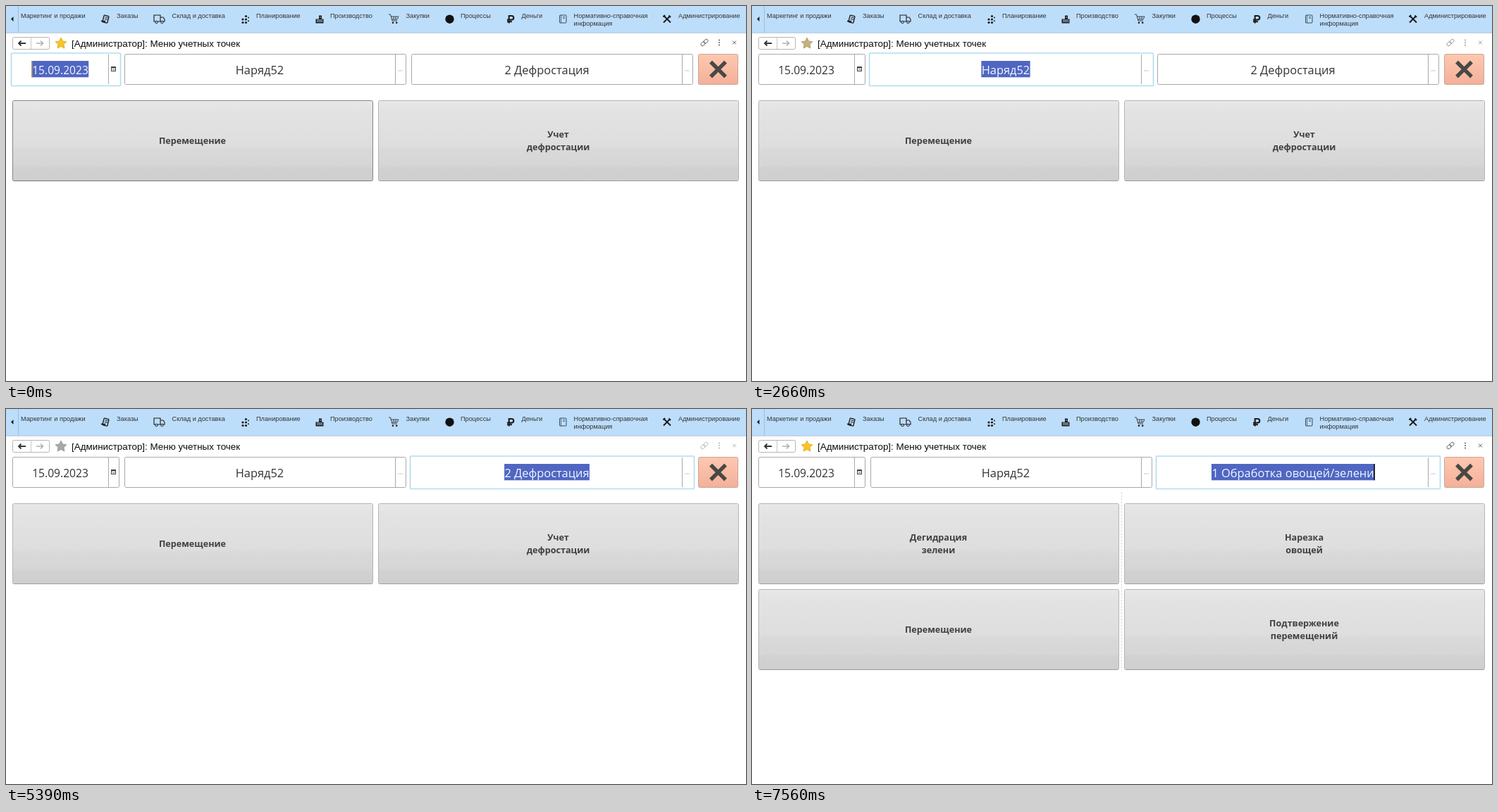
Write an HTML page that moves like this. It is 1050x533 px and loops after 8000 ms.

```html
<!DOCTYPE html>
<html lang="ru">
<head>
<meta charset="utf-8">
<title>Меню учетных точек</title>
<style>
html, body { margin: 0; width: 100%; height: 100%; overflow: hidden; background: #fff; }
svg { display: block; width: 100vw; height: 100vh; }
text { white-space: pre; fill: #333; }
.ui { font: 9.2px "Liberation Sans", Arial, sans-serif; }
.title { font: 13.4px "Liberation Sans", Arial, sans-serif; fill: #0c0c0c; }
.big { font: 16.4px "Open Sans", "Noto Sans", sans-serif; fill: #333; }
.list { font: 14.1px "Open Sans", "Noto Sans", sans-serif; fill: #333; }
.btn { font: bold 12.6px "Open Sans", "Noto Sans", sans-serif; fill: #404040; }
.mid { text-anchor: middle; }
</style>
</head>
<body>
<svg viewBox="0 0 1050 533">
  <defs>
    <linearGradient id="grey" x2="0" y2="1">
      <stop offset="0" stop-color="#e8e8e8"/><stop offset=".13" stop-color="#e3e3e3"/>
      <stop offset=".56" stop-color="#dedede"/><stop offset=".62" stop-color="#d9d9d9"/>
      <stop offset=".8" stop-color="#d6d6d6"/><stop offset=".84" stop-color="#d1d1d1"/>
      <stop offset="1" stop-color="#cfcfcf"/>
    </linearGradient>
    <linearGradient id="red" x2="0" y2="1">
      <stop offset="0" stop-color="#ffc8b0"/><stop offset="1" stop-color="#f2b09a"/>
    </linearGradient>
    <linearGradient id="green" x2="0" y2="1">
      <stop offset="0" stop-color="#a2ffa0"/><stop offset="1" stop-color="#8af688"/>
    </linearGradient>
    <filter id="shadow" x="-5%" y="-5%" width="110%" height="110%">
      <feDropShadow dx="0" dy="1" stdDeviation="1.6" flood-opacity=".28"/>
    </filter>
    <clipPath id="rows"><rect x="707" y="158" width="286" height="302"/></clipPath>
  </defs>
  <g id="bar"></g>
  <g id="view"></g>
</svg>
<script>
const LOOP = 8000, STEP = 70;
const SHIFT = 'Наряд52';
const POINTS = ['1 Обработка овощей/зелени', '2 Дефростация', '3 Обработка специй', '4 Супы/бульоны',
  '5 Выпуск ПФ', '6 Сервировка', '7 Тоннельный шокер', '8 Маркировка', 'Инвентаризация'];

const bar = document.getElementById('bar');
const view = document.getElementById('view');
const pen = document.createElement('canvas').getContext('2d');

const within = (t, a, b) => t >= a && t < b;
const ramp = (t, a, b) => Math.min(1, Math.max(0, (t - a) / (b - a)));
const mix = (a, b, k) => `rgb(${a.map((v, i) => Math.round(v + (b[i] - v) * k))})`;

const text = (x, y, s, cls = 'ui', fill = '') =>
  `<text x="${x}" y="${y}" class="${cls}"${fill && ` style="fill:${fill}"`}>${s}</text>`;
const rect = (x, y, w, h, fill = 'none', stroke = 'none', r = 0, sw = 1) =>
  `<rect x="${x}" y="${y}" width="${w}" height="${h}" rx="${r}" fill="${fill}" stroke="${stroke}" stroke-width="${sw}"/>`;
const line = (d, stroke, sw = 1, extra = '') =>
  `<path d="${d}" fill="none" stroke="${stroke}" stroke-width="${sw}" ${extra}/>`;
const shape = (d, fill = '#1c1c1c') => `<path d="${d}" fill="${fill}"/>`;
const dot = (x, y, r, fill = '#1c1c1c') => `<circle cx="${x}" cy="${y}" r="${r}" fill="${fill}"/>`;
const at = (x, y, s, extra = '') => `<g transform="translate(${x} ${y})${extra}">${s}</g>`;

function star(x, y, r, fill, stroke) {
  let pts = '';
  for (let i = 0; i < 10; i++) {
    const a = Math.PI * (i / 5 - .5), q = i % 2 ? r * .5 : r;
    pts += `${(x + q * Math.cos(a)).toFixed(2)},${(y + q * Math.sin(a)).toFixed(2)} `;
  }
  return `<polygon points="${pts}" fill="${fill}" stroke="${stroke}" stroke-linejoin="round"/>`;
}

const cross = (x, y, r, color, sw) =>
  line(`M${x - r} ${y - r}L${x + r} ${y + r}M${x + r} ${y - r}L${x - r} ${y + r}`, color, sw);
const link = (x, y, color) => at(x, y,
  rect(-6, -2.3, 6.6, 4.6, 'none', color, 2.3, .9) + rect(-.6, -2.3, 6.6, 4.6, 'none', color, 2.3, .9), ' rotate(-42)');
const more = (x, y, color) => [-3.5, 0, 3.5].map(d => dot(x, y + d, 1, color)).join('');

function menuBar() {
  const ink = '#1c1c1c', sky = '#bddefb';
  const items = [[21, 'Маркетинг и продажи'], [157, 'Заказы'], [235.5, 'Склад и доставка'], [355, 'Планирование'],
    [460, 'Производство'], [567.5, 'Закупки'], [645, 'Процессы'], [731.5, 'Деньги'],
    [805.5, 'Нормативно-справочная'], [954, 'Администрирование']];
  let s = rect(0, 0, 1050, 38, sky) + line('M0 38.2H1050', '#a9c6de') + line('M17.5 0V38', '#9dbfdb') +
    shape('M10.5 15V22L7 18.5Z') + items.map(([x, label]) => text(x, 17, label)).join('') + text(805.5, 28, 'информация');
  s += at(141, 18.5, rect(-3, -5, 7, 10, sky, ink, 1, 1.4) +
    line('M-1 -2.5H3M-1 0H3M-1 2.5H1', ink) + line('M-5 4H1', ink, 2), ' rotate(14)');
  s += at(217, 18, line('M-7 -5H2V4H-7ZM2 -2H6L8 1V4H2', ink, 1.1) +
    [-3.5, 4.5].map(x => `<circle cx="${x}" cy="5" r="1.7" fill="${sky}" stroke="${ink}"/>`).join(''));
  s += at(340, 19, dot(-4, 0, 1.6) + dot(-4, 4.5, 1.6) + dot(.5, 0, 1.6) + dot(.5, 4.5, 1.6) +
    dot(.5, -4.5, 1.6) + dot(4, -2.5, 1) + dot(4, 2.3, 1));
  s += at(445, 18.5, shape('M-5.5 6V0H-1V-5H3V0H5.5V6Z') + line('M-4 3.5H4.5M0 -2.5H2M-4 1.5H4', sky, .9));
  s += at(550, 18, line('M-7 -6H-4.5L-2 3H5M-4 -3H7L5 1H-2.5M0 -3V1M3 -3V1', ink, .8) +
    dot(-1, 5.8, 1.3) + dot(4.2, 5.8, 1.3));
  s += dot(629.5, 18.7, 6.2, '#111');
  s += at(716, 18.5, line('M-2.3 6V-4.5H1.5A2.8 2.8 0 0 1 1.5 1.1H-5M-5 3.7H2', ink, 2.1));
  s += at(790, 18.5, rect(-4.5, -5.5, 9.5, 11, 'none', '#35495a', 1) + line('M-2.5 -5.5V5.5M0 -3H3M0 -1H3', '#35495a', .8));
  s += at(938, 18.5, line('M-4 -4L5 5M4 -4L-5 5', ink, 2) + line('M-5.5 -3L-3 -5.5M2.5 -5L5 -2.5', ink, 2.2));
  return s;
}

function header(gone) {
  const icon = mix([90, 90, 90], [180, 180, 180], gone);
  return rect(9.5, 44.5, 52, 17, '#fff', '#b5b5b5', 2) + line('M35.5 45V61', '#c8c8c8') +
    line('M28 53H18M21.5 49.5L18 53L21.5 56.5', '#333', 1.8) +
    line('M43 53H52M49 49.5L52.5 53L49 56.5', '#b0b0b0', 1.6) +
    star(78, 53.3, 8.3, mix([248, 196, 38], [168, 168, 168], gone), mix([226, 176, 44], [158, 158, 158], gone)) +
    text(93, 57.5, '[Администратор]: Меню учетных точек', 'title') +
    link(991, 52, icon) + more(1012, 52, icon) + cross(1033.5, 52, 2.4, icon, 1);
}

// caret: -1 at the left edge of the selection, 1 at the right edge
function field(x, w, split, cx, value, focused, hover, caret, size = 16.4) {
  let s = focused ? rect(x - 1.5, 67, w + 3, 46.5, '#fff', '#b2dcef', 1, 1.6) : rect(x + .5, 68.5, w - 1, 43, '#fff', '#a8a8a8', 2);
  if (hover) s += rect(split + 1, 70, x + w - split - 3, 41, '#e4e4e4');
  s += line(`M${split + .5} 69V111`, '#a8a8a8');
  if (focused) {
    pen.font = `${size}px "Open Sans", "Noto Sans", sans-serif`;
    const half = pen.measureText(value).width / 2 + .4;
    s += rect(cx - half, 78, half * 2, 23.3, '#4f67c2');
    if (caret) s += rect(cx + caret * half - .7, 78, 1.6, 23.3, caret < 0 ? '#a58b70' : '#111');
  }
  return s + `<text x="${cx}" y="97" class="big mid" style="font-size:${size}px${focused ? ';fill:#f4f6ff' : ''}">${value}</text>`;
}

const dots = x => [-2.3, 0, 2.3].map(d => rect(x + d - .4, 91.5, .9, 1, '#777')).join('');

function tile(x, y, lines, hover) {
  const first = y + 62 - (lines.length - 1) * 9;
  return rect(x + .5, y + .5, 511, 114, 'url(#grey)', hover ? '#858585' : '#b4b4b4', 2) +
    line(`M${x + 2} ${y + 114.5}H${x + 510}`, hover ? '#777' : '#9c9c9c') +
    lines.map((s, i) => text(x + 255.5, first + i * 18, s, 'btn mid')).join('');
}

function redButton(x, y, w, h, r, sw) {
  return rect(x + .5, y + .5, w - 1, h - 1, 'url(#red)', '#c9a596', 2) + cross(x + w / 2, y + h / 2, r, '#484844', sw);
}

function greenButton(x, y, hover, ring) {
  const fill = hover > .9 ? '#8eef87' : 'url(#green)';
  return (ring ? rect(x - 2, y - 2, 144, 47, '#fff', '#c5ddc5', 1) : '') +
    rect(x + .5, y + .5, 139, 42, fill, hover ? '#5e9a5c' : '#86b886', 2) +
    line(`M${x + 59} ${y + 22}L${x + 66} ${y + 28.5}L${x + 79.5} ${y + 14}`, '#454a42', 4.2);
}

function dialog(x, y, h, title, titleX, body, hover, ring, solid) {
  const ink = '#444', ty = y + 15.5;
  return `<g${solid ? ' filter="url(#shadow)"' : ''}>${rect(x + .5, y + .5, 309, h - 1, '#fff', '#b0b0b0')}</g>` +
    text(titleX, y + 20.3, title, 'title') + more(x + 250.5, ty, ink) +
    rect(x + 270, ty - 2.7, 5.8, 5.5, 'none', ink, 0, 1.2) + cross(x + 295, ty, 3.4, ink, 1.1) +
    rect(x + 9.5, y + 32, 286, 33, '#f2f4f4') + line(`M${x + 10} ${y + 64.7}H${x + 295}`, '#d5d8d8') +
    text(x + 16, y + 54, 'Наименование', 'list', '#555') +
    line(`M${x + 281} ${y + 39.5}V${y + 46}M${x + 279} ${y + 44}L${x + 281} ${y + 46.2}L${x + 283} ${y + 44}`, '#333') +
    body + rect(x + 9.5, y + 32.5, 286, h - 92.5, 'none', '#a8a8a8') +
    redButton(x + 9, y + h - 53, 140, 43, 10, 5) + greenButton(x + 156, y + h - 53, hover, ring);
}

const rowIcon = (x, y) => rect(x, y, 7.5, 3.4, '#5687b0') + line(`M${x} ${y + 1.4}H${x + 7.5}`, '#a9cbe6', .9);

function shiftDialog(t) {
  const body = rect(382.5, 161, 284, 28, '#def0fe', '#a8d2ea') + rowIcon(389.5, 168) + dot(397.5, 174.5, 2.2, '#e5a93a') +
    text(405, 181, SHIFT, 'list');
  return dialog(372, 95, 428, 'Смены', 403, body, ramp(t, 3220, 3360), t >= 3570, t >= 2870) +
    star(390, 111, 6, '#fff', '#aaa') + link(600, 110.5, '#555');
}

function pointDialog(t) {
  const pitch = 30.8, picked = t < 6160 ? 1 : 0;
  const rows = POINTS.map((name, i) => {
    const y = 190 + i * pitch;
    const fill = i === picked ? '#def0fe' : i === 0 && t >= 6090 ? '#eff7fe' : '#fff';
    const edge = i === picked && t < 6650 ? '#a8d2ea' : 'none';
    return rect(707.5, y, 285, pitch - .8, fill, edge) + line(`M707 ${y + pitch - .4}H993`, '#e3e3e3') +
      rowIcon(714.5, y + 7.7) + text(730, (y + 21).toFixed(1), name, 'list');
  }).join('');
  return dialog(697, 125, 395, 'Учетные точки', 706, `<g clip-path="url(#rows)">${rows}</g>`,
    ramp(t, 6580, 6790), t >= 6930, t >= 5600);
}

function calendar(hoverDay) {
  const grid = '#dedede', rowY = i => 155.8 + i * 22.2, colX = i => 115 + i * 25.1;
  const cell = (x, y, s, color) => text(x, (y + 3.2).toFixed(1), s, 'ui mid', color);
  let s = rect(12, 113.5, 275.5, 195, '#fff', '#a6a6a6', 0, 3) + rect(14, 115.5, 271.5, 191, 'none', '#e2e2e2');
  s += rect(20.5, 122.5, 77.5, 177, 'none', grid) + rect(102.5, 122.5, 176, 177, 'none', grid);
  for (let i = 0; i < 7; i++) s += line(`M20.5 ${144.7 + i * 22.2}H98`, grid) + (i ? line(`M102.5 ${144.7 + i * 22.2}H278.5`, grid) : '');
  s += line('M102.5 144.7H278.5M59.5 144.7V278M228.5 122.5V144.7M253.5 122.5V144.7', grid);
  for (let i = 1; i < 7; i++) s += line(`M${102.5 + i * 25.1} 166.9V299.5`, grid);
  s += text(31, 137, '2023') + text(109.5, 137, 'Сентябрь') +
    shape('M95.5 138.5V142H92Z', '#444') + shape('M225.5 138.5V142H222Z', '#444') +
    line('M242 131L239.5 133.5L242 136M265 131L267.5 133.5L265 136', '#333', 1.2);
  s += rect(60.5, 190, 36.5, 20, '#5c5c5c');
  'Янв Фев Мар Апр Май Июн Июл Авг Сен Окт Ноя Дек'.split(' ').forEach((m, i) => {
    s += cell(i < 6 ? 39.5 : 78.5, rowY(i % 6), m, i === 8 ? '#dcdcdc' : '');
  });
  s += text(59, 292.3, 'Сегодня', 'ui mid', '#4a97c8') + line('M41 295H77', '#4a97c8', 1, 'stroke-dasharray="2.5 1.5"');
  'Пн Вт Ср Чт Пт Сб Вс'.split(' ').forEach((d, i) => { s += cell(colX(i), rowY(0) - .5, d, i > 4 ? '#c5481e' : ''); });
  for (let i = 0; i < 42; i++) {
    const n = i - 3, own = n > 0 && n <= 30, x = colX(i % 7), y = rowY(1 + Math.floor(i / 7));
    const label = n < 1 ? n + 31 : own ? n : n - 30;
    if (n === 15) s += rect(x - 11, y - 10.2, 22.5, 20.4, '#585858', '#a9cfe4');
    else if (own && n === hoverDay) s += rect(x - 11.5, y - 10.3, 23.5, 20.6, '#e9f4fc');
    s += cell(x, y, label, n === 15 ? '#e0e0e0' : !own ? '#a6a6a6' : i % 7 > 4 ? '#c5481e' : '');
  }
  return s;
}

function scene(t) {
  const focus = t < 2380 ? 1 : t < 5040 ? 2 : 3;
  const gone = t < 3710 ? ramp(t, 2520, 2730) : t < 7420 ? ramp(t, 5180, 5390) : 0;
  const popup = ramp(t, 490, 700) * (1 - ramp(t, 1400, 1610));
  const next = t >= 7420;
  let s = header(gone);
  s += field(9, 152, 145, 77, '15.09.2023', focus === 1, within(t, 490, 980), popup ? 0 : -1, 15.6);
  s += rect(149.5, 86.5, 6, 6, '#fff', '#444') + rect(149, 86, 7, 2.4, '#444') + line('M151 90.5H154.5', '#777');
  s += field(168, 400, 552, 360, SHIFT, focus === 2, within(t, 2240, 2660), 0) + dots(559.5);
  s += field(575, 400, 959, 767.5, POINTS[next ? 0 : 1], focus === 3, within(t, 4900, 5390), t >= 7560 ? 1 : 0) + dots(966.5);
  s += redButton(982, 68, 57, 44, 10.5, 5.4);
  if (t < 7490) {
    s += tile(9, 134, ['Перемещение'], t < 70 || within(t, 1680, 2030)) +
      tile(528, 134, ['Учет', 'дефростации'], within(t, 4130, 4550));
  } else {
    s += tile(9, 134, ['Дегидрация', 'зелени']) + tile(528, 134, ['Нарезка', 'овощей']) +
      tile(9, 256, ['Перемещение']) + tile(528, 256, ['Подтвержение', 'перемещений']) +
      line('M524.5 118V371', '#d4d4d4', 1, 'stroke-dasharray="2.5 2"');
  }
  const layer = (opacity, body) => opacity > 0 ? `<g opacity="${opacity.toFixed(2)}">${body()}</g>` : '';
  const shown = (from, full, to) => within(t, from, to) ? .85 + .15 * ramp(t, from, full) : 0;
  s += layer(popup, () => calendar(within(t, 1050, 1120) ? 8 : 0));
  s += layer(shown(2730, 2870, 3710), () => shiftDialog(t));
  s += layer(shown(5460, 5600, 7210), () => pointDialog(t));
  return s;
}

bar.innerHTML = menuBar();
const start = performance.now();
let last = -1;
function tick() {
  const t = Math.floor((performance.now() - start) % LOOP / STEP) * STEP;
  if (t !== last) view.innerHTML = scene(last = t);
  requestAnimationFrame(tick);
}
tick();
</script>
</body>
</html>
```
